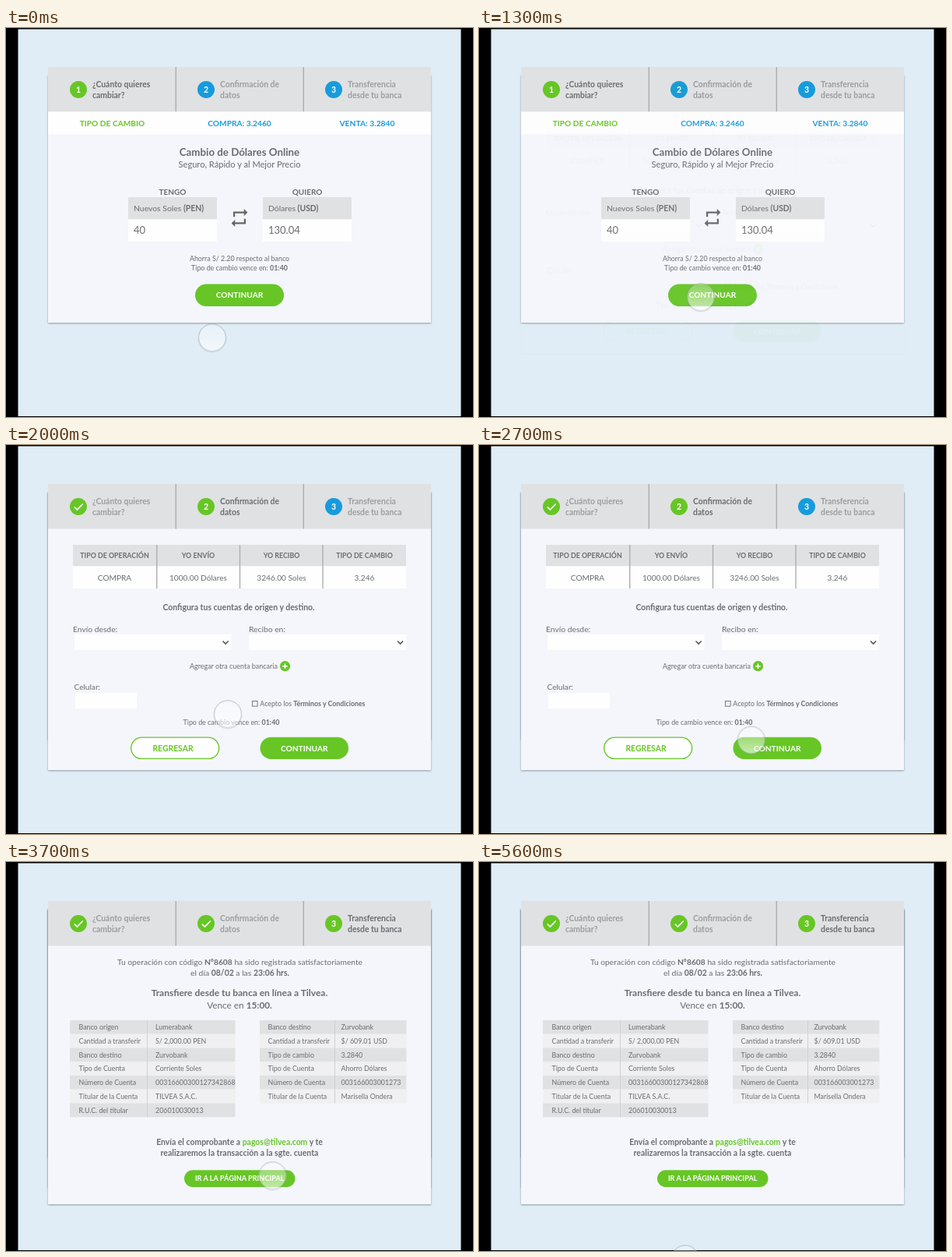
An HTML page for the animation above (5700 ms loop, 600 by 499 pixels).

```html
<!DOCTYPE html>
<html lang="es">
<head>
<meta charset="utf-8">
<title>Cambio de Dólares Online</title>
<style>
  html, body { margin: 0; width: 100%; height: 100%; overflow: hidden; background: #000; }
  svg { display: block; width: 100vw; height: 100vh; }
  text { font-family: Lato, "Open Sans", sans-serif; fill: #6b6c70; }
  .b { font-weight: 700; }
  .m { text-anchor: middle; }
  .dim { fill: #9c9da1; }
  .white { fill: #fff; }
  .green { fill: #67c626; }
  .blue { fill: #179bdc; }
  .grey { fill: #e0e1e3; }
  .paper { fill: #fefefe; }
  .card { fill: #f4f6fb; filter: drop-shadow(0 1px .8px rgba(60, 70, 80, .5)); }
  .rule { stroke: #acadb0; stroke-width: 1.4; }
  .tick { fill: none; stroke: #fff; stroke-width: 1.6; }
  .arrow { fill: none; stroke: #55565a; stroke-width: 1.6; }

  #review { animation: review 5.7s infinite; }
  #transfer { animation: transfer 5.7s infinite; }
  #pointer { animation: move 5.7s infinite; }

  @keyframes review {
    0%, 22.75% { opacity: 0; animation-timing-function: ease-out; }
    26.25%, 100% { opacity: 1; }
  }
  @keyframes transfer {
    0%, 52.6% { opacity: 0; animation-timing-function: ease-out; }
    56.1%, 100% { opacity: 1; }
  }
  @keyframes move {
    0% { transform: translate(265px, 397px); animation-timing-function: ease-in-out; }
    19.5%, 35.09% { transform: translate(285px, 345px); animation-timing-function: ease-in-out; }
    50.88%, 63.2% { transform: translate(357px, 382px); animation-timing-function: cubic-bezier(.33, .67, .67, 1); }
    84.5%, 100% { transform: translate(265px, 509px); }
  }
</style>
</head>
<body>
<svg viewBox="0 0 600 499">
  <defs>
    <linearGradient id="glass" x1="0" y1="0" x2="0" y2="1">
      <stop offset="0" stop-color="#fff" stop-opacity=".22"/>
      <stop offset="1" stop-color="#fff" stop-opacity=".62"/>
    </linearGradient>
  </defs>
  <rect width="600" height="499"/>
  <rect x="15.5" y="1.5" width="569" height="496.5" fill="#e0edf6"/>
  <g id="quote"></g>
  <g id="review"></g>
  <g id="transfer"></g>
  <g id="pointer">
    <circle cy=".8" r="17.8" fill="none" stroke="#8d979f" stroke-opacity=".25" stroke-width="1.4"/>
    <circle r="17.3" fill="url(#glass)" stroke="#a3acb4" stroke-opacity=".55" stroke-width=".8"/>
  </g>
</svg>
<script>
const text = (x, y, size, str, cls = '') =>
  `<text x="${x}" y="${y}" font-size="${size}" class="${cls}">${str}</text>`;
const bold = (str, cls = '') => `<tspan class="b ${cls}">${str}</tspan>`;
const rect = (x, y, w, h, cls, more = '') =>
  `<rect x="${x}" y="${y}" width="${w}" height="${h}" class="${cls}" ${more}/>`;
const path = (d, cls) => `<path d="${d}" class="${cls}"/>`;
const vline = (x, y1, y2) => path(`M${x} ${y1}V${y2}`, 'rule');
const show = (id, ...parts) => {
  document.getElementById(id).innerHTML = parts.flat().join('');
};

const steps = [
  ['¿Cuánto quieres', 'cambiar?'],
  ['Confirmación de', 'datos'],
  ['Transferencia', 'desde tu banca'],
];

// Card with the three step tabs; earlier steps are ticked, later ones blue
function card(bottom, active) {
  const tabs = steps.map((lines, i) => {
    const x = 93 + 164 * i;
    const cls = 'b' + (i === active ? '' : ' dim');
    const mark = i < active
      ? path(`M${x - 5.2} 79.5l3.6 3.6 7.4-7.6`, 'tick')
      : text(x, 83, 10.5, i + 1, 'b m white');
    return `<circle cx="${x}" cy="79" r="11" class="${i > active ? 'blue' : 'green'}"/>` + mark +
      lines.map((s, n) => text(x + 18, 76 + 13.6 * n, 10.4, s, cls)).join('');
  });
  return rect(54, 60, 492, bottom - 60, 'card') + rect(54, 50, 492, 57.5, 'grey') +
    vline(218.3, 50, 107.5) + vline(382.3, 50, 107.5) + tabs.join('');
}

function button(x, y, w, h, size, label) {
  return rect(x, y, w, h, 'green', `rx="${h / 2}"`) +
    text(x + w / 2, y + h / 2 + size * .36, size, label, 'b m white');
}

function amount(x, title, label, value) {
  return text(x + 57, 213.6, 10, title, 'b m') +
    rect(x, 217, 114, 28.5, 'grey') + rect(x, 245.5, 114, 28.5, 'paper') +
    text(x + 7, 235, 10.4, label) + text(x + 7, 264.3, 13, value);
}

function select(x, w, labelX, label) {
  return text(labelX, 239.5, 10.3, label) + rect(x, 243, w, 20, 'paper') +
    path(`M${x + w - 11} 251.5l3.6 3.6 3.6-3.6`, 'arrow');
}

function table(x, w, keyX, split, valueX, rows) {
  const h = 17.75;
  return rows.map(([key, value], i) => {
    const y = 203 + h * i;
    return rect(x, y, w, h, '', `fill="${i % 2 ? '#f0f0f2' : '#e0e1e3'}"`) +
      text(keyX, y + 12, 8.85, key) + text(valueX, y + 12, 8.85, value);
  }).join('') + `<path d="M${split} 203v${h * rows.length}" stroke="#cfd0d3"/>`;
}

const expires = 'Tipo de cambio vence en: ' + bold('01:40');

show('quote',
  card(378, 0),
  rect(54, 107.5, 492, 29, 'paper'),
  text(136.5, 126, 10.2, 'TIPO DE CAMBIO', 'b m green'),
  text(300, 126, 10.2, 'COMPRA: 3.2460', 'b m blue'),
  text(464, 126, 10.3, 'VENTA: 3.2840', 'b m blue'),
  text(300, 164, 13.3, 'Cambio de Dólares Online', 'b m'),
  text(300, 178.8, 11.1, 'Seguro, Rápido y al Mejor Precio', 'm'),
  amount(157, 'TENGO', 'Nuevos Soles ' + bold('(PEN)'), '40'),
  amount(330, 'QUIERO', 'Dólares ' + bold('(USD)'), '130.04'),
  `<path transform="translate(286.2 229.7) scale(1.15)" fill="#66676b"
    d="M7 7h10v3l4-4-4-4v3H5v6h2zM17 17H7v-3l-4 4 4 4v-3h12v-6h-2z"/>`,
  text(300, 298.6, 8.9, 'Ahorra S/ 2.20 respecto al banco', 'm'),
  text(300, 311.4, 8.9, expires, 'm'),
  button(243, 328.5, 114, 28.5, 10.2, 'CONTINUAR'));

const columns = [
  [139.5, 'TIPO DE OPERACIÓN', 'COMPRA'],
  [247, 'YO ENVÍO', '1000.00 Dólares'],
  [354, 'YO RECIBO', '3246.00 Soles'],
  [460.5, 'TIPO DE CAMBIO', '3.246'],
];

show('review',
  card(417, 1),
  rect(86, 128, 428, 27.5, 'grey'), rect(86, 155.5, 428, 28.5, 'paper'),
  columns.map(([x, head, value]) =>
    text(x, 144.8, 8.85, head, 'b m') + text(x, 173.8, 10.1, value, 'm')),
  [193.7, 300.5, 407].map(x => vline(x, 128, 184)),
  text(299, 212.4, 10.5, 'Configura tus cuentas de origen y destino.', 'b m'),
  select(88, 201.5, 86, 'Envío desde:'),
  select(312, 202, 312, 'Recibo en:'),
  text(236, 286.8, 8.95, 'Agregar otra cuenta bancaria'),
  '<circle cx="358.5" cy="283.7" r="6.6" class="green"/>',
  path('M355.2 283.7h6.6M358.5 280.4v6.6', 'tick'),
  text(87.5, 313.5, 10.1, 'Celular:'), rect(89, 318, 79, 20, 'paper'),
  rect(316.5, 328.5, 6.6, 6.6, '', 'fill="none" stroke="#6b6c70" stroke-width=".9"'),
  text(326.3, 335, 8.8, 'Acepto los ' + bold('Términos y Condiciones')),
  text(289.5, 359.2, 8.9, expires, 'm'),
  rect(160.7, 375.2, 113, 27.2, 'paper', 'rx="13.6" stroke="#67c626" stroke-width="1.3"'),
  text(214.5, 392.6, 10.4, 'REGRESAR', 'b m green'),
  button(326.5, 374.7, 113.5, 28.3, 10.2, 'CONTINUAR'));

show('transfer',
  card(439, 2),
  text(300.5, 132.3, 10.25, `Tu operación con código ${bold('Nº8608')} ha sido registrada satisfactoriamente`, 'm'),
  text(300.5, 146, 10.4, `el día ${bold('08/02')} a las ${bold('23:06 hrs.')}`, 'm'),
  text(300, 172.3, 12, 'Transfiere desde tu banca en línea a Tilvea.', 'b m'),
  text(300, 188, 11.8, 'Vence en ' + bold('15:00.'), 'm'),
  table(82, 212.5, 93.5, 181.5, 192, [
    ['Banco origen', 'Lumerabank'],
    ['Cantidad a transferir', 'S/ 2,000.00 PEN'],
    ['Banco destino', 'Zurvobank'],
    ['Tipo de Cuenta', 'Corriente Soles'],
    ['Número de Cuenta', '00316600300127342868'],
    ['Titular de la Cuenta', 'TILVEA S.A.C.'],
    ['R.U.C. del titular', '206010030013'],
  ]),
  table(326, 188.5, 336.5, 422.5, 430.5, [
    ['Banco destino', 'Zurvobank'],
    ['Cantidad a transferir', '$/ 609.01 USD'],
    ['Tipo de cambio', '3.2840'],
    ['Tipo de Cuenta', 'Ahorro Dólares'],
    ['Número de Cuenta', '003166003001273'],
    ['Titular de la Cuenta', 'Marisella Ondera'],
  ]),
  text(300, 363.3, 10.45, `Envía el comprobante a ${bold('pagos@tilvea.com', 'green')} y te`, 'b m'),
  text(300, 376.8, 10.5, 'realizaremos la transacción a la sgte. cuenta', 'b m'),
  button(229, 395.3, 142.5, 21.6, 9.2, 'IR A LA PÁGINA PRINCIPAL'));
</script>
</body>
</html>
```
